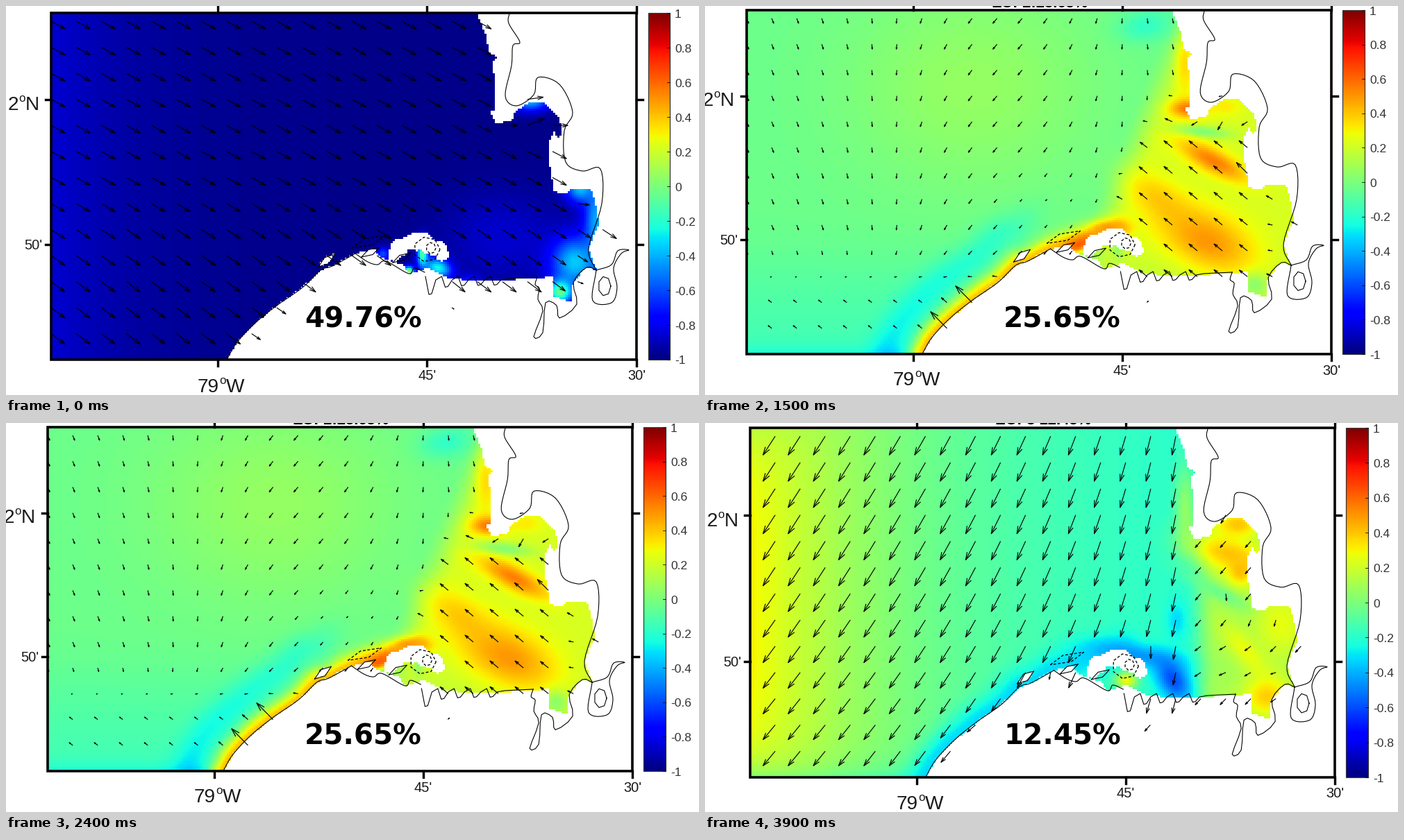
A matplotlib script that plays this animation: 998x561 px, repeating every 4500 ms.

```python
import numpy as np
import matplotlib.pyplot as plt
from matplotlib.animation import FuncAnimation
from matplotlib.collections import LineCollection
from matplotlib.patches import Rectangle
from matplotlib.path import Path

W, H, DPI = 998, 561, 100
PT = 72 / DPI  # points per pixel
BASE = (65, 10, 908, 510)  # left, top, right, bottom of the map frame
INK, GREY = "#1a1a1a", "#333333"


def curve(points, steps=6):
    """Catmull-Rom curve through the key points."""
    p = np.array(points, float)
    p = np.vstack([2 * p[0] - p[1], p, 2 * p[-1] - p[-2]])
    a, b, c, d = (p[k:len(p) - 3 + k, None, :] for k in range(4))
    t = (np.arange(steps) / steps)[None, :, None]
    arc = b + .5 * t * (c - a + t * (2 * a - 5 * b + 4 * c - d + t * (3 * (b - c) + d - a)))
    return np.vstack([arc.reshape(-1, 2), p[-2]])


def smooth(t):
    t = np.clip(t, 0, 1)
    return t * t * (3 - 2 * t)


def blend(base, x, y, patches):
    """Fade the base towards each patch: x, y, width, height, tilt, value(s)."""
    out = np.array(base, float)
    for px, py, rx, ry, tilt, *value in patches:
        c, s = np.cos(np.radians(tilt)), np.sin(np.radians(tilt))
        u = ((x - px) * c + (y - py) * s) / rx
        v = ((y - py) * c - (x - px) * s) / ry
        out += np.exp(-u * u - v * v) * (np.reshape(value, (-1, 1)) - out)
    return out


# Coast, in pixels of the base frame
SOUTHWEST = [(318, 510), (332, 486), (358, 458), (390, 432), (427, 406), (453, 381),
             (470, 375), (503, 357)]
LAGOON = [(503, 357), (521, 369), (535, 373), (547, 368), (580, 386), (588, 378), (603, 384)]
INLET = [(765, 391), (762, 402), (768, 407), (766, 423), (773, 440), (760, 477), (773, 471),
         (777, 428), (793, 432), (797, 450), (822, 430), (817, 399), (836, 377), (850, 381)]
NORTHEAST = [(725, 10), (724, 25), (740, 52), (730, 57), (728, 86), (719, 130), (735, 144),
             (760, 128), (766, 103), (797, 113), (816, 153), (804, 180), (806, 225),
             (830, 238), (856, 235), (858, 285), (839, 350), (850, 381)]
RIVER = [(850, 381), (872, 373), (881, 353), (897, 352), (886, 357), (875, 378), (880, 406),
         (872, 428), (845, 425), (850, 381)]
EAST_EDGE = [(679, 0), (679, 12), (692, 45), (695, 66), (707, 74), (701, 80), (705, 124),
             (705, 149), (698, 153), (705, 169), (729, 165), (733, 152), (753, 139),
             (775, 138), (796, 159), (801, 178), (797, 193), (790, 181), (783, 194),
             (783, 227), (789, 268), (806, 272), (812, 264), (842, 264), (852, 295),
             (853, 316), (839, 350), (850, 381)]
SOUTH_EDGE = [(836, 377), (817, 399), (814, 427), (787, 419), (787, 391), (700, 397),
              (640, 394), (606, 378), (582, 387), (572, 374), (536, 361), (532, 350)]


def teeth():
    """Small creeks along the delta front."""
    points = []
    for k in range(5):
        x, depth = 611 + 23.5 * k, 11 + 14 / (1 + k) ** 2
        points += [(x - 7, 390), (x - 2, 391 + depth), (x + 2, 390 + depth), (x + 8, 395)]
    return points + [(724, 393), (765, 391)]


def slanted(x, y, w, h):
    return [(x - w, y + h), (x - w / 4, y - h / 2), (x + w, y - h), (x + w / 4, y + h / 2),
            (x - w, y + h)]


def ring(x, y, rx, ry):
    a = np.linspace(0, 2 * np.pi, 8)
    return np.column_stack([x + rx * np.cos(a), y + ry * np.sin(a)])


ISLET = slanted(462, 367, 12, 9)
COAST = [curve(SOUTHWEST), curve(LAGOON), teeth(), curve(INLET, 3), curve(NORTHEAST),
         curve(RIVER), ISLET, slanted(525, 355, 13, 7), slanted(570, 363, 13, 7),
         ring(862, 404, 9, 14)]
DASHED = [slanted(522, 340, 24, 9), ring(606, 351, 19, 18), ring(612, 349, 7, 8)]
SHORE = curve(SOUTHWEST + [(545, 342), (600, 327)])
SEA = Path([(55, 0), *EAST_EDGE, *SOUTH_EDGE, *SOUTHWEST[::-1], (318, 520), (55, 520)])

# Ragged flats in front of the delta
rng = np.random.default_rng(4)
ARC = np.linspace(0, 1, 13)
FLATS = np.column_stack([556 + 72 * ARC, 358 - 20 * np.sin(np.pi * ARC)])
FLATS += rng.uniform(-4, 4, FLATS.shape)
FLAT_SIZE = rng.uniform(7, 13, len(ARC))


def is_water(at):
    gap = np.linalg.norm(at[:, None] - FLATS, axis=2)
    dry = (gap < FLAT_SIZE).any(axis=1) | Path(ISLET).contains_points(at)
    return SEA.contains_points(at) & ~dry


def field_1(x, y, shore):
    base = -.98 + .13 * np.exp(-(x - 65) / 110)
    return blend(base[None], x, y, [
        (715, 335, 85, 65, 0, -.86), (755, 136, 28, 15, 0, -.4), (828, 262, 22, 22, 0, -.35),
        (850, 310, 18, 60, 0, -.42), (820, 370, 36, 38, 0, -.35), (798, 412, 18, 17, 0, -.05),
        (622, 378, 20, 14, 20, -.25), (668, 402, 14, 12, 0, -.6), (600, 357, 8, 20, 0, -.1),
        (543, 358, 10, 10, 0, -.6), (580, 384, 8, 8, 0, .1)])


def field_2(x, y, shore):
    base = -.04 + .1 * np.exp(-((x - 390) / 180) ** 2 - ((y - 120) / 150) ** 2)
    base -= .08 * smooth((y - 300) / 180) + .12 * np.exp((y - 510) / 14)
    base += .26 * smooth((x + .4 * (y - 200) - 600) / 65)
    base -= .14 * np.exp(-((shore - 50) / 25) ** 2) * smooth((520 - x) / 100)
    base += np.exp(-(shore / 17) ** 2) * (.42 - base)
    return blend(base[None], x, y, [
        (640, 32, 38, 22, -10, -.18), (697, 90, 14, 45, 0, .35), (702, 153, 26, 14, 0, .58),
        (755, 150, 25, 14, 0, .32), (720, 187, 42, 9, 5, 0), (738, 229, 55, 17, 28, .55),
        (660, 285, 55, 28, 35, .38), (730, 345, 75, 42, 25, .5), (545, 350, 28, 11, -25, .62),
        (590, 326, 25, 9, 0, .5), (798, 410, 17, 17, 0, .04), (600, 355, 8, 18, 0, .05)])


def field_3(x, y, shore):
    base = -.25 + .56 * np.exp(-(x - 65) / 270)
    base -= .17 * np.exp(-(x - 65) / 60) * (np.abs(y - 260) / 250) ** 4
    base -= .14 * np.exp((y - 510) / 18)
    base += (.1 - base) * smooth((x - 690) / 50) * smooth((y - 90) / 60)
    base += np.exp(-(shore / 26) ** 2) * (-.32 - base)
    return blend(base[None], x, y, [
        (692, 125, 14, 60, 0, .05), (755, 190, 58, 26, 15, .4), (768, 148, 34, 20, 0, .4),
        (772, 215, 20, 22, 0, .42), (740, 245, 55, 11, 28, -.04), (680, 285, 14, 26, 0, -.32),
        (830, 290, 38, 50, 0, .26), (778, 328, 50, 18, 50, .27), (620, 335, 65, 16, 10, -.45),
        (675, 370, 36, 22, 60, -.6), (810, 395, 34, 30, 0, .38), (608, 371, 15, 12, 0, .28)])


def flow_1(x, y):
    base = [20 + 0 * x, 11 + 4 * smooth((y - 230) / 180)]
    return blend(base, x, y, [
        (751, 158, 45, 30, 0, 25, -15), (823, 285, 20, 20, 0, 17, 2),
        (823, 400, 25, 45, 0, 8, 3), (642, 370, 22, 18, 0, 9, 17),
        (372, 455, 32, 20, -45, 6, 3), (642, 435, 25, 20, 0, 3, 2)])


def flow_2(x, y):
    south = smooth((y - 330) / 120)
    east = smooth((x + .4 * (y - 200) - 600) / 60) * smooth((y - 90) / 90)
    u = 3 - 9 * np.exp(-((x - 440) / 170) ** 2)
    u, v = u + south * (-5 - u), 7 - 11 * south
    base = [u + east * (-12 - u), v + east * (-10 - v)]
    return blend(base, x, y, [
        (500, 290, 85, 50, 0, -2, 2), (751, 165, 60, 22, 0, -6, 14),
        (785, 247, 25, 20, 0, -16, -16), (835, 345, 30, 75, 0, -5, 1),
        (372, 454, 45, 18, -45, -31, -32), (642, 435, 25, 20, 0, 2, -2)])


def flow_3(x, y):
    east = smooth((x - 675) / 42) * smooth((y - 90) / 60)
    u = -17.5 + 12 * ((x - 65) / 610) ** 2
    v = 27 - 6 * smooth((y - 150) / 320)
    base = [u + east * (-8 - u), v + east * (9 - v)]
    return blend(base, x, y, [
        (751, 345, 60, 32, 0, -10, 3), (751, 247, 18, 18, 0, 1, 10),
        (810, 285, 40, 20, 0, -2, 9), (823, 375, 25, 25, 0, -7, 0),
        (640, 340, 40, 35, 0, 2, 16), (498, 360, 20, 15, 0, -2, 10),
        (390, 440, 55, 25, -45, -12, 10), (642, 435, 25, 20, 0, -8, 9)])


MODES = [
    dict(box=(65, 10, 908, 510), bar=(925, 956), label_x=963, share="49.76%", title="",
         north=(3, 150), west=(276, 557), minutes=539, field=field_1, flow=flow_1),
    dict(box=(60, 6, 902, 502), bar=(918, 950), label_x=957, share="25.65%",
         title="EOF2:25.65%", north=(-3, 144), west=(271, 547), minutes=532,
         field=field_2, flow=flow_2),
    dict(box=(65, 7, 907, 511), bar=(923, 955), label_x=962, share="12.45%",
         title="EOF3 12.45%", north=(3, 149), west=(276, 557), minutes=540,
         field=field_3, flow=flow_3),
]


def water_grid(cell=3):
    left, top, right, bottom = BASE
    nx, ny = round((right - left) / cell), round((bottom - top) / cell)
    x = left + (np.arange(nx) + .5) * (right - left) / nx
    y = top + (np.arange(ny) + .5) * (bottom - top) / ny
    gx, gy = np.meshgrid(x, y)
    return np.column_stack([gx.ravel(), gy.ravel()]), (ny, nx)


def arrow_tails():
    """Regular stations on the water or just off its edge, and one inland."""
    gx, gy = np.meshgrid(65 + 36.1 * np.arange(23), 22 + 37.55 * np.arange(13))
    at = np.column_stack([gx.ravel(), gy.ravel()])
    a = np.arange(8) * np.pi / 4
    near = [SEA.contains_points(at + 9.5 * np.array([np.cos(k), np.sin(k)])) for k in a]
    flats = np.linalg.norm(at[:, None] - FLATS, axis=2).min(axis=1) < 20
    return np.vstack([at[np.any(near, axis=0) & ~flats], (642, 435)])


GRID, SHAPE = water_grid()
WET = is_water(GRID)
TO_SHORE = np.linalg.norm(GRID[:, None] - SHORE, axis=2).min(axis=1)
TAILS = arrow_tails()
for mode in MODES:
    value = np.clip(mode["field"](*GRID.T, TO_SHORE)[0], -1, 1)
    mode["map"] = np.ma.masked_array(value, ~WET).reshape(SHAPE)
    mode["arrows"] = mode["flow"](*TAILS.T).T

fig = plt.figure(figsize=(W / DPI, H / DPI), dpi=DPI, facecolor="white")
ax = fig.add_axes([0, 0, 1, 1])


def place(points, box):
    """Move base coordinates into the given map frame."""
    l, t, r, b = BASE
    scale = np.array([(box[2] - box[0]) / (r - l), (box[3] - box[1]) / (b - t)])
    return (np.array(points, float) - (l, t)) * scale + box[:2]


def line(points, width, **style):
    x, y = np.array(points, float).T
    ax.plot(x, y, color="black", lw=width * PT, **style)


def text(x, y, s, px, color=INK, font="Liberation Sans", **style):
    ax.text(x, y, s, fontsize=px * PT, color=color, family=font, **style)


def degrees(x, y, number, letter):
    text(x, y, number, 28)
    x += .556 * 28 * len(number)
    text(x, y - 12, "o", 17)
    text(x + 9.5, y, letter, 28)


def draw_coast(box):
    for part in COAST:
        line(place(part, box), 1.1)
    for part in DASHED:
        line(place(part, box), 1.3, dashes=(3, 2))


def draw_arrows(tails, vec, frame):
    tips = tails + vec
    side = .11 * np.column_stack([-vec[:, 1], vec[:, 0]])
    neck = tips - .36 * vec
    shafts = np.stack([tails, tips], axis=1)
    heads = np.stack([neck + side, tips, neck - side], axis=1)
    arrows = LineCollection([*shafts, *heads], colors="black", linewidths=1.15 * PT, zorder=4)
    ax.add_collection(arrows, autolim=False)
    arrows.set_clip_path(frame)


def draw_frame(box, minutes_y):
    l, t, r, b = box
    frame = Rectangle((l, t), r - l, b - t, fill=False, ec="black", lw=3.6 * PT, zorder=5)
    ax.add_patch(frame)
    (x0, y0), (x1, y1) = place([(305.5, 135), (606.5, 344)], box)
    for x in (x0, x1, r):
        line([(x, b), (x, b + 9)], 3.4)
        line([(x, t), (x, t - 9)], 3.4)
    for y in (y0, y1):
        line([(l, y), (l - 8, y)], 3.4)
        line([(r, y), (r + 9, y)], 3.4)
    text(l - 13, y1 + 7, "50'", 20, ha="right")
    text(x1, minutes_y, "45'", 20, ha="center")
    text(r, minutes_y, "30'", 20, ha="center")
    return frame


def draw_field(values, extent):
    ax.imshow(values, cmap="jet", vmin=-1, vmax=1, extent=extent, aspect="auto",
              interpolation="nearest")


def draw_bar(left, right, top, bottom, label_x):
    draw_field(np.linspace(1, -1, 256)[:, None], (left, right, bottom, top))
    ax.add_patch(Rectangle((left, top), right - left, bottom - top, fill=False, ec=GREY,
                           lw=1.2 * PT))
    for k in range(11):
        y = top + (bottom - top) * k / 10
        line([(right - 4, y), (right, y)], .8)
        text(label_x, y + 6.5, f"{(5 - k) / 5:g}", 17.5, GREY)


def draw(i):
    mode = MODES[i % len(MODES)]
    box = l, t, r, b = mode["box"]
    ax.clear()
    ax.axis("off")
    draw_field(mode["map"], (l, r, b, t))
    draw_coast(box)
    frame = draw_frame(box, mode["minutes"])
    draw_arrows(place(TAILS, box), mode["arrows"], frame)
    draw_bar(*mode["bar"], t, b, mode["label_x"])
    degrees(*mode["north"], "2", "N")
    degrees(*mode["west"], "79", "W")
    text((l + r) / 2 + 1, 2, mode["title"], 22, "black", ha="center", weight="bold")
    text(514.5, 463, mode["share"], 40.5, "black", "DejaVu Sans", ha="center", weight="bold")
    ax.set_xlim(0, W)
    ax.set_ylim(H, 0)
    return []


anim = FuncAnimation(fig, draw, frames=len(MODES), interval=1500, repeat=True)
plt.show()
```
